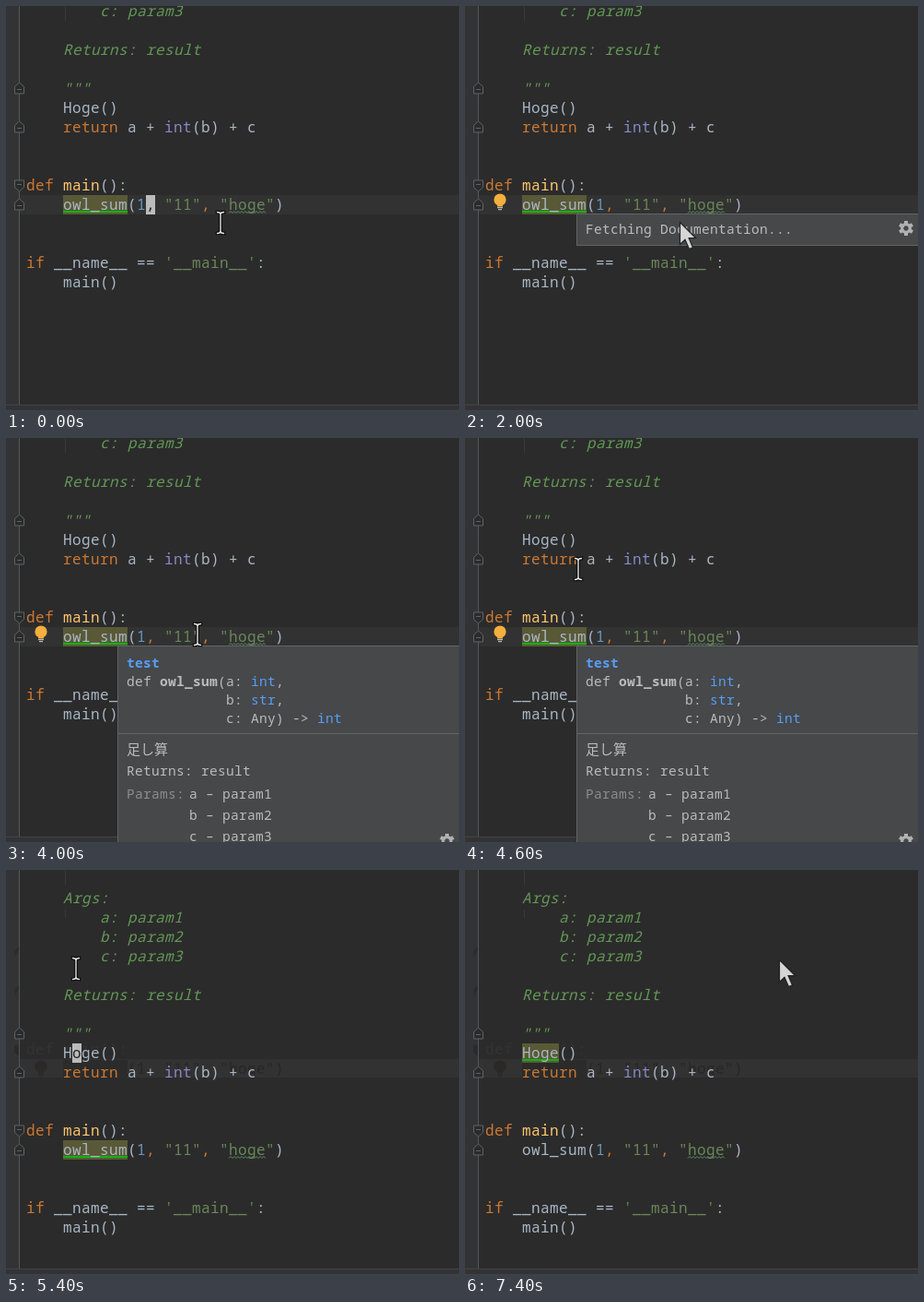
Write an HTML page with a canvas that moves like this. It is 492 px wide and 438 px high and loops after 8000 ms.

```html
<!DOCTYPE html>
<html lang="en">
<head>
<meta charset="utf-8">
<title>Editor quick documentation</title>
<style>
html, body { margin: 0; width: 100%; height: 100%; overflow: hidden; background: #2b2b2b; }
canvas { display: block; }
</style>
</head>
<body>
<canvas id="stage" width="492" height="438"></canvas>
<script>
const ctx = document.getElementById('stage').getContext('2d');
const W = 492, H = 438, LOOP = 8000;
const ROW = 21, CELL = 10, LEFT = 22;
const MONO = '"Noto Sans Mono", "DejaVu Sans Mono", monospace';
const C = {
  bg: '#2b2b2b', gutter: '#313335', line: '#323232', text: '#a9b7c6', key: '#cc7832',
  func: '#ffc66d', str: '#6a8759', num: '#6897bb', doc: '#629755', builtin: '#8888c6',
  caret: '#bbbbbb', panel: '#46484a', edge: '#626466', label: '#bbbbbb', dim: '#8c8c8c', link: '#589df6'
};

// row number -> [column, [style, text]...]
const code = {
  0: [4, ['doc', 'Args:']],
  1: [8, ['doc', 'a: param1']],
  2: [8, ['doc', 'b: param2']],
  3: [8, ['doc', 'c: param3']],
  5: [4, ['doc', 'Returns: result']],
  7: [4, ['doc', '"""']],
  8: [4, ['text', 'Hoge()']],
  9: [4, ['key', 'return '], ['text', 'a + '], ['builtin', 'int'], ['text', '(b) + c']],
  12: [0, ['key', 'def '], ['func', 'main'], ['text', '():']],
  13: [4, ['text', 'owl_sum('], ['num', '1'], ['key', ', '], ['str', '"11"'], ['key', ', '],
    ['str', '"hoge"'], ['text', ')']],
  16: [0, ['key', 'if '], ['text', '__name__ == '], ['str', "'__main__'"], ['text', ':']],
  17: [4, ['text', 'main()']]
};
const HOGE = 8, CALL = 13;
const folds = [[7, 1], [9, 1], [12, -1], [13, 1]]; // row, direction

// [from, row, column, character]; row -1 hides the caret
const carets = [
  [0, CALL, 13, ','], [800, CALL, 12, '1'], [1000, CALL, 11, '('], [1200, CALL, 10, 'm'], [1800, -1],
  [5400, HOGE, 5, 'o'], [6400, -1], [7000, HOGE, 5, 'o'], [7400, -1]
];
// [from, x, y, shape]
const pointers = [
  [0, 233, 235, beam], [1800, 233, 234, arrow], [4000, 208, 213, beam], [4200, 160, 168, beam],
  [4400, 123, 143, beam], [4600, 123, 142, beam], [4800, 78, 114, beam], [5000, 71, 107, beam],
  [5200, 76, 107, beam], [5600, 89, 109, beam], [6000, 160, 109, beam], [6200, 336, 98, beam],
  [6400, 341, 98, beam], [7000, 341, 97, arrow]
];

const at = (steps, t) => steps.filter(s => s[0] <= t).pop();
const colX = col => LEFT + col * CELL;

function rect(x, y, w, h, color) {
  ctx.fillStyle = color;
  ctx.fillRect(x, y, w, h);
}

function write(s, x, y, color, font, gap = '0px') {
  ctx.font = font;
  ctx.letterSpacing = gap;
  ctx.fillStyle = color;
  ctx.fillText(s, x, y);
}

function codeText(s, x, top, color, style = '500') {
  write(s, x, top + 16, color, `${style} 16px ${MONO}`, '0.4px');
}

function docText(s, x, y, color = C.label, style = '') {
  write(s, x, y, color, `${style} 14.5px ${MONO}`, '0.3px');
}

function codeRow(row, top, color) {
  let [col, ...tokens] = code[row];
  for (const [style, s] of tokens) {
    codeText(s, colX(col), top, color || C[style], style === 'doc' ? 'italic 500' : '500');
    col += s.length;
  }
}

function polygon(points, fill, stroke, width = 1) {
  ctx.beginPath();
  points.forEach(([x, y]) => ctx.lineTo(x, y));
  ctx.closePath();
  ctx.lineWidth = width;
  if (fill) { ctx.fillStyle = fill; ctx.fill(); }
  if (stroke) { ctx.strokeStyle = stroke; ctx.stroke(); }
}

function fold(y, dir, fill, color) {
  const shape = [[-5, 5.5], [5, 5.5], [5, -2], [0, -6.5], [-5, -2]];
  polygon(shape.map(([px, py]) => [14.5 + px, y + py * dir]), fill, color);
  rect(12, y + dir - 0.5, 5, 1, color);
}

function usage(col, top, length) {
  rect(colX(col), top, length * CELL, ROW, '#5a5937');
  rect(colX(col), top + 17, length * CELL, 2, '#10b410');
}

function wave(x, y, width) {
  ctx.beginPath();
  for (let i = 0; i <= width; i += 2) ctx.lineTo(x + i, y + (i % 4 ? -1 : 1));
  ctx.strokeStyle = '#5f8f62';
  ctx.lineWidth = 1;
  ctx.stroke();
}

function bulb(x, y, glass, base) {
  ctx.fillStyle = glass;
  ctx.beginPath();
  ctx.arc(x, y, 6.6, 0, Math.PI * 2);
  ctx.fill();
  rect(x - 3, y + 4, 6, 3.5, glass);
  rect(x - 3, y + 8, 6, 1.2, base);
  rect(x - 2, y + 10, 4, 1.2, base);
}

function gear(x, y) {
  ctx.save();
  ctx.translate(x, y);
  ctx.fillStyle = '#afb1b3';
  for (let i = 0; i < 6; i++) {
    ctx.fillRect(-2, -8, 4, 5);
    ctx.rotate(Math.PI / 3);
  }
  ctx.beginPath();
  ctx.arc(0, 0, 4.3, 0, Math.PI * 2);
  ctx.strokeStyle = '#afb1b3';
  ctx.lineWidth = 3.2;
  ctx.stroke();
  ctx.restore();
}

function beam(x, y) {
  const trace = () => {
    ctx.beginPath();
    for (const s of [-1, 1]) {
      ctx.moveTo(x - 3.5, y + 11.5 * s);
      ctx.quadraticCurveTo(x, y + 11.5 * s, x, y + 9 * s);
      ctx.quadraticCurveTo(x, y + 11.5 * s, x + 3.5, y + 11.5 * s);
    }
    ctx.moveTo(x, y - 10);
    ctx.lineTo(x, y + 10);
    ctx.stroke();
  };
  ctx.lineCap = 'square';
  ctx.strokeStyle = '#000';
  ctx.lineWidth = 3.4;
  trace();
  ctx.strokeStyle = '#e8e8e8';
  ctx.lineWidth = 1.4;
  trace();
  ctx.lineCap = 'butt';
}

function arrow(x, y) {
  const shape = [[0, 0], [0, 24], [5.5, 18.7], [10, 29], [14, 27.2], [9.6, 17.2], [17, 17]];
  polygon(shape.map(([px, py]) => [x + px + 0.5, y + py + 0.5]), '#d6d6d6', '#222', 1.2);
}

// faint leftovers of the view before it scrolled
function remains() {
  rect(15, 205, W - 15, ROW - 1, C.line);
  rect(colX(4), 206, 7 * CELL, ROW - 2, C.bg);
  codeRow(12, 184, '#343332');
  codeText('(1, "11", "hoge")', colX(11), 205, '#292725');
  bulb(38, 213, '#2a2927', '#2a2927');
  for (const y of [89.5, 131.5]) polygon([[9.5, y + 5], [9.5, y - 2], [14, y - 6], [18, y - 3], [13, y - 2]], '#2b2b2c');
  fold(195.5, -1, C.bg, '#2b2b2c');
}

function editor(t) {
  const scrolled = t >= 5400;
  const base = scrolled ? 20 : -68;
  const top = row => base + row * ROW;
  rect(0, 0, W, H, C.bg);
  rect(0, 0, 14, 432, C.gutter);
  if (scrolled) remains();
  else rect(15, top(CALL), W - 15, ROW, C.line);
  rect(14, 0, 1, 432, '#555759');
  rect(64, 0, 1, 16, '#393939');
  if (scrolled) rect(64, 43, 1, 9, '#393939');

  if (t < 5800) usage(4, top(CALL), 7);
  else usage(4, top(HOGE), 4);

  for (const row in code) codeRow(row, top(row));
  wave(colX(22), top(CALL) + 18.5, 40);
  for (const [row, dir] of folds) fold(top(row) + 10.5, dir, C.bg, '#606264');

  if (t >= 800 && t < 1200) {
    for (const [col, ch] of [[11, '('], [27, ')']]) {
      rect(colX(col), top(CALL), CELL, ROW, '#3b514d');
      codeText(ch, colX(col), top(CALL), '#ffef28', 'bold');
    }
  }
  const [, row, col, ch] = at(carets, t);
  if (row >= 0) {
    rect(colX(col), top(row), CELL, ROW, C.caret);
    codeText(ch, colX(col), top(row), '#222');
  }
  if (t >= 2000 && !scrolled) bulb(38, 210, '#f4af3d', '#b8babc');

  rect(0, 432, W, 1, '#434446');
  rect(0, 433, W, 5, '#333234');
}

function panel(height) {
  rect(121, 225, W - 121, height, C.edge);
  rect(122, 226, W - 122, height - 2, C.panel);
}

function fetching() {
  panel(35);
  docText('Fetching Documentation...', 131, 247);
  gear(479, 241);
}

function documentation() {
  const x = 131, put = (col, y, s, color, style) => docText(s, x + col * 9, y, color, style);
  panel(H);
  put(0, 249, 'test', C.link, 'bold');
  put(0, 269, 'def');
  put(4, 269, 'owl_sum', C.label, 'bold');
  put(11, 269, '(a:');
  put(15, 269, 'int', C.link);
  put(18, 269, ',');
  put(12, 289, 'b:');
  put(15, 289, 'str', C.link);
  put(18, 289, ',');
  put(12, 309, 'c: Any) ->');
  put(23, 309, 'int', C.link);
  rect(122, 320, W - 122, 1, C.edge);
  write('足し算', x, 343, C.label, '15px "Noto Sans CJK JP", "Noto Sans CJK", sans-serif');
  put(0, 366, 'Returns: result');
  put(0, 391, 'Params:', C.dim);
  ['a', 'b', 'c'].forEach((name, i) => docText(`${name} – param${i + 1}`, 199, 391 + 23 * i));
  gear(479, 437);
}

function draw() {
  const t = performance.now() % LOOP;
  editor(t);
  if (t >= 1800 && t < 2400) fetching();
  if (t >= 2400 && t < 5400) documentation();
  const [, x, y, shape] = at(pointers, t);
  shape(x, y);
  requestAnimationFrame(draw);
}
draw();
</script>
</body>
</html>
```
